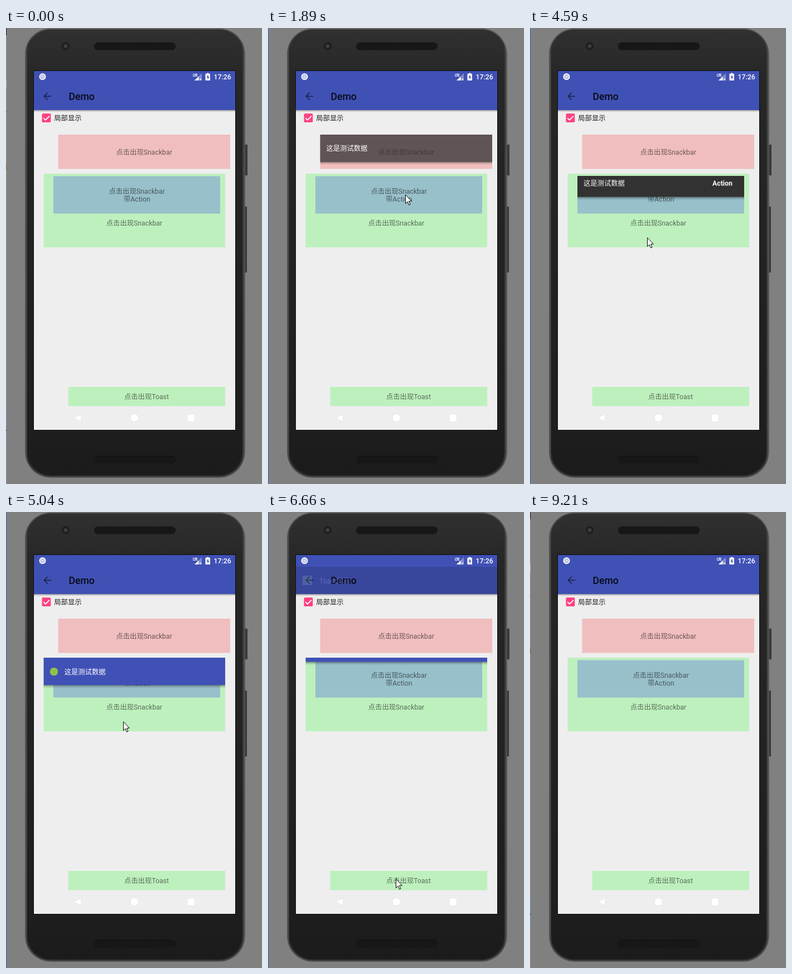
An HTML page for the animation above (9330 ms loop, 459 px wide and 817 px high).

```html
<!DOCTYPE html>
<html lang="zh">
<head>
<meta charset="utf-8">
<title>Demo</title>
<style>
html, body { margin: 0; width: 100%; height: 100%; overflow: hidden; background: #808080; }
svg { display: block; width: 459px; height: 817px; }
text { font: 12.3px Roboto, "Noto Sans CJK SC", "Noto Sans CJK", sans-serif; }
.mid { text-anchor: middle; fill: rgba(0, 0, 0, .54); }
.white { fill: #fff; }
.strong { font-weight: 500; }

.snack, .toast, .edge, .cursor { animation: 9330ms linear infinite; }
.snack { animation-timing-function: cubic-bezier(.4, 0, .2, 1); }
.s1 { animation-name: s1; }
.s2 { animation-name: s2; }
.s3 { animation-name: s3; }
.toast { animation-name: toast; }
.cursor { animation-name: cursor; }
.edge { animation-name: edge; animation-timing-function: step-end; }

@keyframes s1 {
  0%, 9.07% { transform: translateY(-60px); }
  9.08% { transform: translateY(-49px); }
  11.76%, 27.55% { transform: none; }
  30.23% { transform: translateY(-49px); }
  30.24%, 100% { transform: translateY(-60px); }
}
@keyframes s2 {
  0%, 30.65% { transform: translateY(-60px); }
  30.66% { transform: translateY(-49px); }
  33.34%, 48.54% { transform: none; }
  51.22% { transform: translateY(-49px); }
  51.23%, 100% { transform: translateY(-60px); }
}
@keyframes s3 {
  0%, 51.29% { transform: translateY(-60px); }
  51.3% { transform: translateY(-49px); }
  53.98%, 69.87% { transform: none; }
  72.55% { transform: translateY(-49px); }
  72.56%, 100% { transform: translateY(-60px); }
}
@keyframes toast {
  0%, 70.74% { opacity: 0; }
  75.24%, 91.53% { opacity: 1; }
  95.82%, 100% { opacity: 0; }
}
@keyframes edge {
  0% { opacity: 0; }
  .643% { opacity: 1; }
  98.71%, 100% { opacity: 0; }
}
@keyframes cursor {
  0%, .63% { transform: translate(475px, 120px); }
  .64% { transform: translate(459px, 120px); }
  3.2% { transform: translate(380px, 170px); animation-timing-function: ease-out; }
  7.72%, 13.18% { transform: translate(277px, 217px); animation-timing-function: ease-in-out; }
  18%, 19.61% { transform: translate(246px, 294px); }
  20.26%, 33.55% { transform: translate(246px, 298px); }
  37.3% { transform: translate(218px, 368px); }
  38.26% { transform: translate(212px, 376px); }
  39.87% { transform: translate(212px, 377px); }
  40.19%, 44.04% { transform: translate(210px, 376px); }
  44.05%, 55.63% { transform: translate(210px, 375px); }
  57.88% { transform: translate(197px, 470px); }
  60.45% { transform: translate(222px, 692px); animation-timing-function: ease-out; }
  62.7%, 77.49% { transform: translate(229px, 657px); }
  80.39% { transform: translate(203px, 560px); }
  84.14% { transform: translate(300px, 300px); }
  87.46% { transform: translate(375px, 121px); }
  90.03% { transform: translate(430px, 62px); }
  91.6% { transform: translate(459px, 60px); }
  91.7%, 100% { transform: translate(475px, 60px); }
}
</style>
</head>
<body>
<svg viewBox="0 0 459 817">
  <defs>
    <linearGradient id="rim" x2="1" y2="0">
      <stop offset="0" stop-color="#5e5e5e"/><stop offset=".012" stop-color="#303030"/>
      <stop offset=".985" stop-color="#303030"/><stop offset="1" stop-color="#4c4c4c"/>
    </linearGradient>
    <linearGradient id="face" x2="0" y2="1">
      <stop offset="0" stop-color="#303030"/><stop offset=".1" stop-color="#272727"/>
      <stop offset=".9" stop-color="#1e1e1e"/><stop offset="1" stop-color="#1b1b1b"/>
    </linearGradient>
    <linearGradient id="shade" x2="0" y2="1">
      <stop offset="0" stop-opacity=".38"/><stop offset=".5" stop-opacity=".13"/><stop offset="1" stop-opacity="0"/>
    </linearGradient>
    <pattern id="mesh" width="3" height="3" patternUnits="userSpaceOnUse">
      <rect width="3" height="3" fill="#101010"/><circle cx="1.5" cy="1.5" r=".8" fill="#333"/>
    </pattern>
    <clipPath id="redBox"><rect x="93.5" y="191" width="308.5" height="61.5"/></clipPath>
    <clipPath id="blueBox"><rect x="85" y="265.5" width="299" height="67"/></clipPath>
    <clipPath id="greenBox"><rect x="67.5" y="261" width="325.5" height="132"/></clipPath>
  </defs>

  <!-- window edge -->
  <rect width="459" height="817" fill="#808080"/>
  <rect width="1" height="817" fill="#999"/>
  <path d="M0 0h1v13H0zM0 149h1v1H0zM0 720h1v2H0z" fill="#222"/>
  <path d="M0 93h1v15H0z" fill="#bbb"/>
  <path d="M0 244h1v10H0z" fill="#8a6a20"/>
  <path d="M0 690h1v28H0zM0 724h1v22H0z" fill="#7899c2"/>
  <rect class="edge" width="1" height="817" fill="#3565b5"/>

  <!-- phone -->
  <path d="M428 209h5v55h-5zM428 320h4v118h-4z" fill="#3a3a3a"/>
  <rect x="34" y="1" width="394.5" height="804.5" rx="46" fill="url(#rim)"/>
  <rect x="35" y="2" width="392.5" height="802.5" rx="45" fill="none" stroke="#555" stroke-width="1.4"/>
  <rect x="38" y="4.500" width="386" height="797" rx="42" fill="url(#face)"/>
  <circle cx="107" cy="32.500" r="7" fill="#1d1d1d"/>
  <circle cx="107" cy="32.500" r="4" fill="#333"/>
  <circle cx="107" cy="32.500" r="2" fill="#454545"/>
  <rect x="158.500" y="26.500" width="145" height="12.500" rx="6" fill="url(#mesh)" stroke="#111"/>
  <rect x="158.500" y="767" width="145" height="12.500" rx="6" fill="url(#mesh)" stroke="#111"/>
  <rect x="49" y="76" width="363" height="645" fill="#0c0c0c"/>
  <rect x="50" y="77" width="361" height="643" fill="#eee"/>

  <!-- bars -->
  <rect x="50" y="147" width="361" height="4" fill="url(#shade)"/>
  <rect x="50" y="77" width="361" height="70" fill="#4051b5"/>
  <circle cx="65.500" cy="87.300" r="5" fill="#a9b1dc" stroke="#fff" stroke-width="2"/>
  <circle cx="65.500" cy="87.300" r="2.500" fill="#d5d9ee"/>
  <text x="335" y="87" class="white" style="font-size:6.500px;font-weight:700" letter-spacing="-.9">LTE</text>
  <path d="M351 81v13h-13z" fill="#fff" opacity=".35"/>
  <path d="M345.500 87v7H338z" fill="#fff"/>
  <path d="M347 90.500l3.500 3.500m0-3.500L347 94" stroke="#fff"/>
  <path d="M360 82v-1.300h3.500V82h2.500v12h-8.500V82z" fill="#fff"/>
  <path d="M362.500 83.500l-3 5h2v4l3-5h-2z" fill="#4051b5"/>
  <text x="372.500" y="92" class="white strong">17:26</text>
  <path transform="translate(63.500 111.700) scale(.88)" d="M20 11H7.830l5.590-5.590L12 4l-8 8 8 8 1.410-1.410L7.830 13H20z" fill-opacity=".54"/>
  <text x="112.500" y="129" class="strong" style="font-size:17.600px" fill-opacity=".87">Demo</text>

  <!-- content -->
  <rect x="64.500" y="153.300" width="15.800" height="15.800" rx="1.800" fill="#ff4081"/>
  <path d="M67.300 161.300l3.600 3.600 7-7.200" fill="none" stroke="#fff" stroke-width="1.800"/>
  <text x="86.300" y="165.500" fill-opacity=".87">局部显示</text>

  <rect x="93.500" y="191" width="308.500" height="61.500" fill="#f0bebe"/>
  <text x="247.700" y="226.500" class="mid">点击出现Snackbar</text>

  <rect x="67.500" y="261" width="325.500" height="132" fill="#bef0be"/>
  <text x="230" y="354" class="mid">点击出现Snackbar</text>
  <rect x="85" y="265.500" width="299" height="67" fill="#98c0cb"/>
  <text x="234.700" y="297" class="mid">点击出现Snackbar</text>
  <text x="234.700" y="311.300" class="mid">带Action</text>

  <rect x="111.500" y="643" width="281.500" height="34.500" fill="#bef0be"/>
  <text x="252" y="665.300" class="mid">点击出现Toast</text>

  <g fill="#fff" stroke="#ddd" stroke-width=".6">
    <path d="M134.500 691.500v14l-12.500-7z"/>
    <circle cx="230.300" cy="698.500" r="7.200"/>
    <rect x="325" y="692" width="13.500" height="13.500" rx="1"/>
  </g>

  <!-- snackbars -->
  <g clip-path="url(#redBox)">
    <g class="snack s1">
      <rect x="93.500" y="240" width="308.500" height="5" fill="url(#shade)"/>
      <rect x="93.500" y="191" width="308.500" height="49" fill="#323232" fill-opacity=".76"/>
      <text x="104.500" y="219.700" class="white">这是测试数据</text>
    </g>
  </g>
  <g clip-path="url(#blueBox)">
    <g class="snack s2">
      <rect x="85" y="314" width="299" height="6" fill="url(#shade)"/>
      <rect x="85" y="265" width="299" height="49" fill="#323232"/>
      <text x="96" y="294" class="white">这是测试数据</text>
      <text x="327" y="294" class="white" style="font-weight:700">Action</text>
    </g>
  </g>
  <g clip-path="url(#greenBox)">
    <g class="snack s3">
      <rect x="67.500" y="310" width="325.500" height="6" fill="url(#shade)"/>
      <rect x="67.500" y="261" width="325.500" height="49" fill="#4051b5"/>
      <circle cx="86" cy="286" r="7.300" fill="#8bc34a"/>
      <text x="104.700" y="290.500" class="white">这是测试数据</text>
    </g>
  </g>

  <g class="toast">
    <rect x="50" y="98" width="361" height="49" fill="#101010"/>
    <rect x="62" y="114" width="17" height="17" fill="#8bc34a"/>
    <text x="92" y="127.500" class="white">Toast显示</text>
  </g>

  <path class="cursor" d="M.500 .700v15.800l3.600-3.400 2.500 5.900 2.400-1-2.500-5.800h4.900z" fill="#fff" stroke="#000"/>
</svg>
</body>
</html>
```
